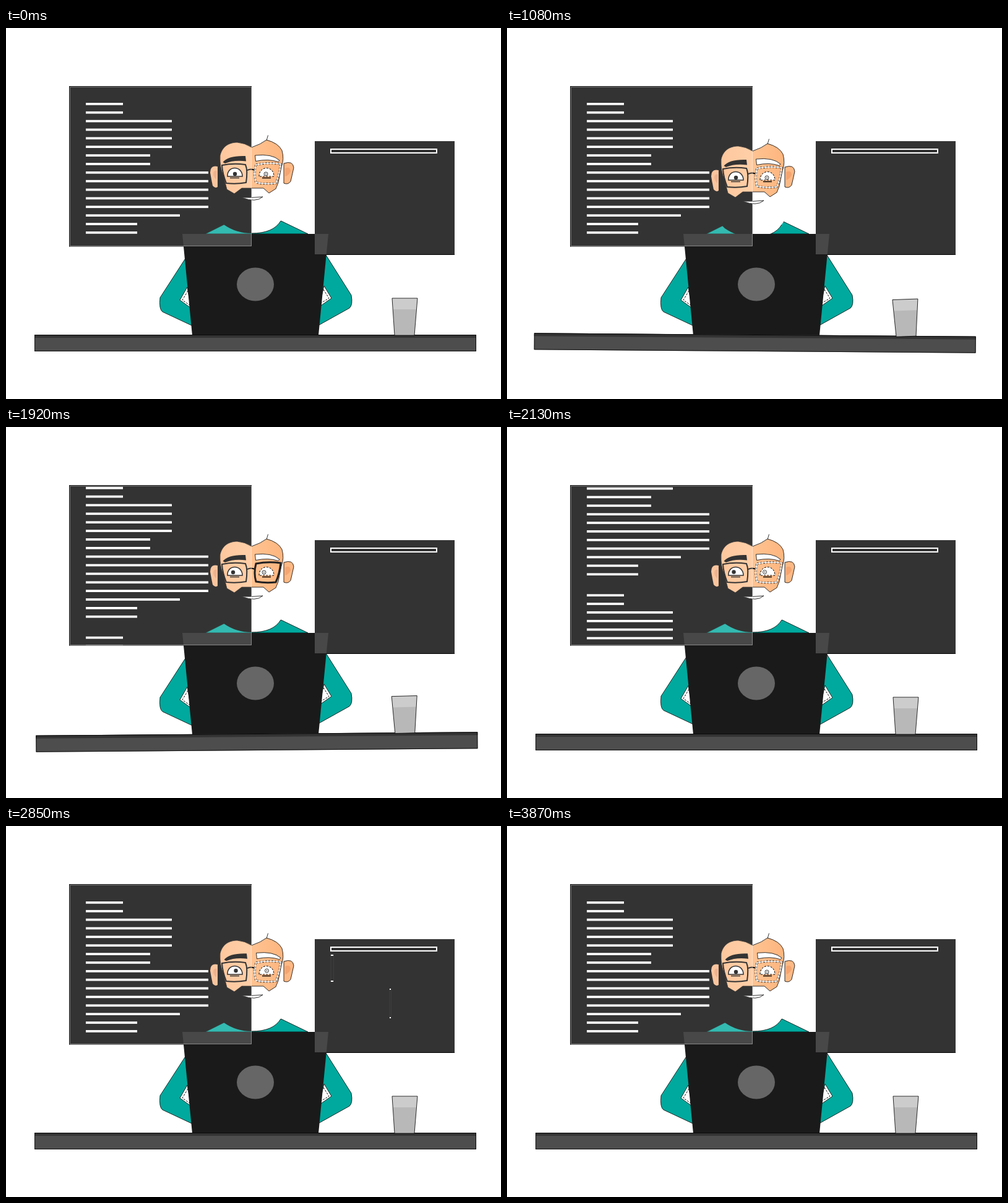
Write an HTML page that moves like this. It is 800 px wide and 600 px high and loops after 4.14 s.

```html
<!DOCTYPE html>
<html>
<head>
<meta charset="utf-8">
<style>
html, body { margin: 0; width: 100%; height: 100%; overflow: hidden; background: #fff; }
svg { display: block; }
.ink { stroke: #000; stroke-width: .8; }
.dots { stroke: #000; stroke-width: 1; stroke-dasharray: 3 2; }
</style>
</head>
<body>
<svg width="800" height="600" viewBox="0 0 800 600">
  <defs>
    <!-- dark over the left panel, white beside it -->
    <linearGradient id="hole" gradientUnits="userSpaceOnUse" x1="396" x2="398" y1="0" y2="0">
      <stop offset=".5" stop-color="#000"/><stop offset=".5" stop-color="#fff"/>
    </linearGradient>
    <linearGradient id="skin" gradientUnits="userSpaceOnUse" x1="346" x2="448" y1="0" y2="0">
      <stop offset="0" stop-color="#fdb985"/><stop offset=".5" stop-color="#ffc392"/><stop offset="1" stop-color="#fdb57e"/>
    </linearGradient>
    <clipPath id="page"><rect x="103" y="94" width="294" height="259"/></clipPath>
  </defs>

  <rect x="102" y="94" width="295" height="259.500"/>
  <rect x="499" y="183" width="226" height="184"/>

  <g fill="#00a99d">
    <g id="armL">
      <path class="ink" d="M291 371L249 436Q247 455 253 459L302 482V371Z"/>
      <path fill="#fff" class="ink" d="M293 419L281 440L299 453Z"/>
      <path fill="none" class="dots" d="M294 425L285 440L298 449"/>
    </g>
    <g id="armR">
      <path class="ink" d="M517 367L558 432Q561 448 555 453L503 482V367Z"/>
      <path fill="#fff" class="ink" d="M514 417L526 437L506 451Z"/>
      <path fill="none" class="dots" d="M513 423L522 437L507 446"/>
    </g>
    <path class="ink" d="M322 333L372 308L430 305L488 333Z"/>
  </g>

  <g id="head">
    <path fill="url(#hole)" d="M338 290L348 314L352 318Q372 332 397 332Q432 332 444 312L447 307L454 290Z"/>
    <path fill="none" class="ink" d="M397 332Q432 332 444 312"/>
    <path fill="none" class="ink" d="M423.500 173.500L421 182"/>
    <path fill="#f9b686" d="M342 224Q330 221 330 234Q332 246 334 255Q338 260 342 257Z"/>
    <path fill="#e9a073" d="M341 231Q335 229 335 237Q337 243 340 245Z"/>
    <path fill="#fdb985" class="ink" d="M449 219Q464 214 465 226Q462 240 460 248Q456 254 449 251Z"/>
    <path fill="#f4a570" d="M451 227Q459 223 460 231Q457 239 451 240Z"/>
    <path fill="url(#skin)" class="ink" d="M346 206C350 190 362 185 374 185Q386 186 397 193Q412 188 421 181Q440 186 446 198Q450 212 445 225L440 250L436 260L425 267L416 259H381L369 268L357 261L351 238Q345 225 346 206Z"/>
    <g id="brows">
      <path d="M350.500 217Q359 206 387 207L388 215.500Q368 213 354 219Z"/>
      <path fill="#fff" class="ink" d="M402.500 206Q430 203 442 214L440 216.500Q424 211 403.500 215.500Z"/>
    </g>
    <path fill="#fff" stroke="#000" stroke-width="1.500" d="M358 240C357 222 382 222 382 240Z"/>
    <path fill="#fff" class="dots" d="M409 240C409 222 433 222 433 240Z"/>
    <path stroke="#000" stroke-width="1.500" d="M362 242.500H377M414 242.500H428"/>
    <g id="pupils">
      <circle cx="370" cy="236" r="3.200"/>
      <circle cx="420" cy="236" r="3" fill="#fff" class="ink"/>
      <circle cx="420" cy="236" r=".8"/>
    </g>
    <path fill="none" stroke="#000" stroke-width="2" d="M349 222Q368 218 387 221Q391 230 388 250Q372 253 356 251Q350 236 349 222ZM390 230Q396 227 402 230"/>
    <g fill="none">
      <path id="rimEdge" stroke="#222" stroke-width="3" d="M404 221Q424 217 444 220Q442 238 436 251Q420 253 404 250Q400 236 404 221Z"/>
      <path id="rim" stroke="#fff" stroke-width="1.600" d="M404 221Q424 217 444 220Q442 238 436 251Q420 253 404 250Q400 236 404 221Z"/>
    </g>
    <path fill="#fff" class="ink" d="M381 274Q398 275 415 273Q404 283 381 274Z"/>
  </g>

  <path fill="#1a1a1a" d="M285 333H521L505 497H301Z"/>
  <ellipse cx="403" cy="414.500" rx="30" ry="27" fill="#666"/>

  <g fill="#fff" fill-opacity=".2">
    <rect x="103" y="95" width="294" height="258"/>
    <rect x="499" y="183" width="226" height="183"/>
  </g>
  <path fill="none" stroke="#fff" stroke-opacity=".35" d="M103.500 352.500V95.500H396.500V352.500Z"/>
  <path fill="none" stroke="#111" d="M102.500 353.500V94.500H397"/>

  <g clip-path="url(#page)"><g id="code" fill="#fff"></g></g>

  <g fill="none" stroke="#fff" stroke-width="2">
    <rect x="525" y="196" width="171" height="6"/>
    <g id="blocks"></g>
  </g>

  <g id="table">
    <rect x="46" y="496" width="714" height="27" fill="#4d4d4d"/>
    <rect x="46" y="496" width="714" height="5" fill="#333"/>
    <rect x="46.500" y="496.500" width="713" height="26" fill="none" class="ink"/>
  </g>
  <g id="glass">
    <path fill="#b8b8b8" d="M624 437H665L660 497H628Z"/>
    <path fill="#ccc" d="M624 437H665L663.500 455H625.200Z"/>
    <path fill="none" class="ink" d="M624 437H665L660 497H628Z"/>
  </g>
</svg>
<script>
const LOOP = 4140, STEP = 30, PAGE = 242;
const $ = id => document.getElementById(id);
const move = (id, value) => $(id).setAttribute('transform', value);

// progress from a to b, eased at both ends
function ease(t, a, b) {
  const u = Math.min(1, Math.max(0, (t - a) / (b - a)));
  return u * u * (3 - 2 * u);
}

// eased value through [time, value] keys
function track(t, keys) {
  let v = keys[0][1];
  for (let i = 1; i < keys.length; i++)
    v += (keys[i][1] - keys[i - 1][1]) * ease(t, keys[i - 1][0], keys[i][0]);
  return v;
}

const tilt = [[0, 0], [330, .4], [540, .1], [660, -.4], [870, .8], [1080, .43],
  [1230, .4], [1440, -.4], [1560, 0], [1770, -.8], [1920, -.45], [2130, 0]];
const lean = [[0, 0], [360, 2], [720, 0], [1080, -2], [1500, 1.5], [1920, -1.5], [2130, 0]];
const lookX = [[1680, 0], [1920, -3], [2370, -4], [2700, -4], [2850, 1.5], [3240, 1.5], [3840, 0]];
const lookY = [[1680, 0], [1920, -1], [2370, -2], [3240, -2], [3840, 0]];

const widths = [60, 60, 139, 139, 139, 139, 104, 104, 198, 198, 198, 198, 198, 152, 83, 83];
$('code').innerHTML = [0, PAGE].map(top => widths.map((w, i) =>
  `<rect x="129" y="${121 + top + i * 13.87}" width="${w}" height="3.700"/>`).join('')).join('');

// x, y, width, height, opening time, closing time
const blocks = [
  [525, 209, 171, 42, 2810, 3540],
  [620, 264, 76, 46, 2810, 3420],
  [525, 264, 84, 89, 2900, 3330]
];
$('blocks').innerHTML = blocks.map(([, , w, h]) => `<rect width="${w}" height="${h}"/>`).join('');

function draw(t) {
  const angle = track(t, tilt);
  const drop = 6 * (ease(t, 0, 330) - ease(t, 1660, 1900));
  const typing = t < 2160 ? 1.5 * Math.sin(t * Math.PI / 180) : 0;

  move('head', `translate(0 ${drop})`);
  move('brows', `translate(${2 * ease(t, 2720, 2850)} ${-.7 * ease(t, 2720, 2850)})`);
  move('pupils', `translate(${track(t, lookX)} ${track(t, lookY)})`);
  move('armL', `translate(0 ${typing})`);
  move('armR', `translate(0 ${-typing})`);
  move('table', `rotate(${angle} 403 210)`);
  move('glass', `translate(0 ${angle * 4.2}) rotate(${track(t, lean)} 644 467)`);
  move('code', `translate(0 ${(1 - PAGE) * ease(t, 1738, 2666)})`);

  // the right rim turns solid while the head shifts
  const solid = t > 0 && t < 570 || t >= 1660 && t < 2130;
  $('rim').style.display = solid ? 'none' : '';
  $('rimEdge').setAttribute('stroke-dasharray', solid ? 'none' : '3 2');

  blocks.forEach(([x, y, , , open, close], i) => {
    const sx = ease(t, open, open + 400), sy = 1 - ease(t, close, close + 310);
    const box = $('blocks').children[i];
    box.style.display = sx * sy ? '' : 'none';
    box.setAttribute('transform', `translate(${x} ${y}) scale(${sx} ${sy})`);
  });
}

function frame() {
  const t = performance.now() % LOOP;
  draw(Math.floor(t / STEP) * STEP);
  requestAnimationFrame(frame);
}
frame();
</script>
</body>
</html>
```
